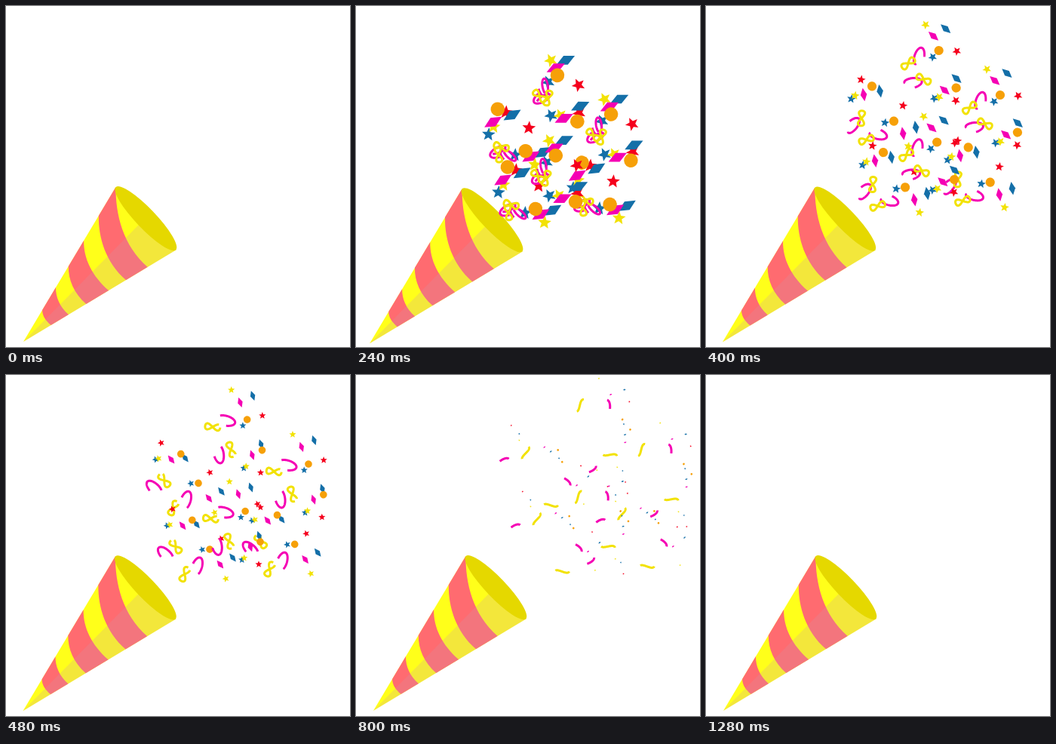
Animation, 456 px wide and 452 px high, one loop 1400 ms. Source, as an HTML page with a canvas:

```html
<!DOCTYPE html>
<html lang="en">
<head>
<meta charset="utf-8">
<title>Party popper</title>
<style>
  html, body { margin: 0; width: 100%; height: 100%; overflow: hidden; background: #fff; }
  canvas { display: block; }
</style>
</head>
<body>
<canvas id="stage" width="456" height="452"></canvas>
<script>
const ctx = document.getElementById('stage').getContext('2d');
const LOOP = 1400, STEP = 40, END = 1280, RAD = Math.PI / 180;
const YELLOW = '#f2e205', PINK = '#f500b4', BLUE = '#146fa8', ORANGE = '#f6a008', RED = '#f5001d';

// Start point and full travel of each piece
const bits = [
  [star, RED, 285, 99, 90, -74],
  [star, RED, 290, 99, 78, 50],
  [star, BLUE, 214, 72, 164, -8],
  [star, BLUE, 222, 115, 153, 14],
  [star, YELLOW, 242, 57, 93, -61],
  [star, YELLOW, 250, 118, 112, 5],
  [diamond, BLUE, 257, 47, 115, -32],
  [diamond, BLUE, 293, 123, 74, -51],
  [diamond, PINK, 244, 62, 109, -42],
  [diamond, PINK, 252, 147, 122, -67],
  [disc, ORANGE, 238, 59, 134, 0],
  [disc, ORANGE, 281, 166, 96, -109]
];
const ribbons = [
  [coil, PINK, 0, 231, 94, 166, -88],
  [coil, PINK, 65, 236, 79, 124, 73],
  [curl, YELLOW, 0, 239, 112, 93, -115],
  [curl, YELLOW, 65, 240, 88, 155, 29]
];

function star(r) {
  for (let i = 0; i < 10; i++) {
    const a = i * 36 * RAD, d = r * (i % 2 ? 0.44 : 1);
    ctx.lineTo(d * Math.sin(a), -d * Math.cos(a));
  }
}

function diamond(r) {
  ctx.moveTo(-1.45 * r, 0);
  ctx.lineTo(0, -0.7 * r);
  ctx.lineTo(1.45 * r, 0);
  ctx.lineTo(0, 0.7 * r);
}

function disc(r) {
  ctx.arc(0, 0, r, 0, 2 * Math.PI);
}

// A ribbon keeps its first end and is trimmed from the other
function coil(left, ease) {
  return {
    from: -1.5, length: 10.5 * left * left, turn: 1080 * ease - 465,
    at: u => [11.5 * (1 - Math.cos(u)), 5 * Math.sin(u) + 0.9 * u]
  };
}

function curl(left, ease) {
  return {
    from: -0.9, length: 14.5 * left * left, turn: 540 * ease - 142,
    at: u => [10 * Math.sin(u), -4 * Math.sin(2 * u)]
  };
}

function drawRibbon(shape, turn) {
  const pts = Array.from({ length: 61 }, (_, i) => shape.at(shape.from + shape.length * i / 60));
  const [mx, my] = [0, 1].map(k => {
    const v = pts.map(p => p[k]);
    return (Math.min(...v) + Math.max(...v)) / 2;
  });
  ctx.rotate((shape.turn + turn) * RAD);
  ctx.beginPath();
  pts.forEach(([x, y]) => ctx.lineTo(x - mx, y - my));
  ctx.lineWidth = 3;
  ctx.lineJoin = 'round';
  ctx.stroke();
}

// Draws at a point of the burst, unaffected by the burst's growth
function place(x, y, grow, color, draw) {
  ctx.save();
  ctx.translate(x, y);
  ctx.scale(1 / grow, 1 / grow);
  ctx.fillStyle = ctx.strokeStyle = color;
  draw();
  ctx.restore();
}

function drawBurst(p, grow) {
  const left = 1 - p, ease = 1 - left * left, r = 15.6 * left ** 2.5;
  for (const [shape, color, x, y, dx, dy] of bits) {
    place(x + dx * ease, y + dy * ease, grow, color, () => {
      ctx.rotate((360 * ease - 148) * RAD);
      ctx.beginPath();
      shape(r);
      ctx.fill();
    });
  }
  for (const [shape, color, turn, x, y, dx, dy] of ribbons) {
    place(x + dx * p, y + dy * p, grow, color, () => drawRibbon(shape(left, ease), turn));
  }
}

const MC = Math.cos(303 * RAD), MS = Math.sin(303 * RAD);
const mirrored = [[0, 0], [15, 87.7], [127.7, 81]].map(([x, y]) => [MC, MS, MS, -MC, 130.4 + x, 443.6 + y]);
const plain = [[0, 0], [81.3, 59], [-2.5, 121.5]].map(([x, y]) => [1, 0, 0, 1, x, y]);

function drawConfetti(t) {
  const grow = 1 - Math.max(0, 1 - t / 320) ** 1.5;
  if (!grow || t >= END) return;
  ctx.save();
  ctx.translate(151, 322);
  ctx.scale(grow, grow);
  ctx.translate(-151, -322);
  for (const matrix of [...mirrored, ...plain]) {
    ctx.save();
    ctx.transform(...matrix);
    drawBurst(t / END, grow);
    ctx.restore();
  }
  ctx.restore();
}

// Stripe edges as fractions of the cone's upper and lower side
const edges = [[1, 0.811], [0.815, 0.67], [0.654, 0.557], [0.488, 0.41], [0.351, 0.295], [0.205, 0.18]];

function fillPoly(color, ...p) {
  ctx.fillStyle = color;
  ctx.beginPath();
  for (let i = 0; i < p.length; i += 2) ctx.lineTo(p[i], p[i + 1]);
  ctx.fill();
}

function drawCone(t) {
  const x = t / 80, back = 12 * x * Math.exp(1 - x);
  ctx.save();
  ctx.translate(23 - back, 445 + back * 0.44);
  fillPoly('#ffff1a', 0, 0, 122.5, -205, 203, -122);
  ctx.fillStyle = '#ff6b70';
  for (let i = 0; i < 6; i += 2) {
    const [a, b] = edges[i], [c, d] = edges[i + 1];
    ctx.beginPath();
    ctx.moveTo(122.5 * a, -205 * a);
    ctx.bezierCurveTo(122 * a, -169 * a, 163 * b, -157 * b, 203 * b, -122 * b);
    ctx.lineTo(203 * d, -122 * d);
    ctx.bezierCurveTo(163 * d, -157 * d, 122 * c, -169 * c, 122.5 * c, -205 * c);
    ctx.fill();
  }
  fillPoly('rgba(203,151,170,.23)', 0, 0, 152.5, -154.5, 163, -164, 203, -122);
  ctx.fillStyle = '#e5d800';
  ctx.beginPath();
  ctx.ellipse(162.4, -163.4, 57.5, 13.2, 46.3 * RAD, 0, 2 * Math.PI);
  ctx.fill();
  ctx.restore();
}

function render(now) {
  const t = Math.min(END, Math.floor((now % LOOP) / STEP) * STEP);
  ctx.fillStyle = '#fff';
  ctx.fillRect(0, 0, 456, 452);
  drawCone(t);
  drawConfetti(t);
}

const start = performance.now();
function tick() {
  render(performance.now() - start);
  requestAnimationFrame(tick);
}
tick();
</script>
</body>
</html>
```
